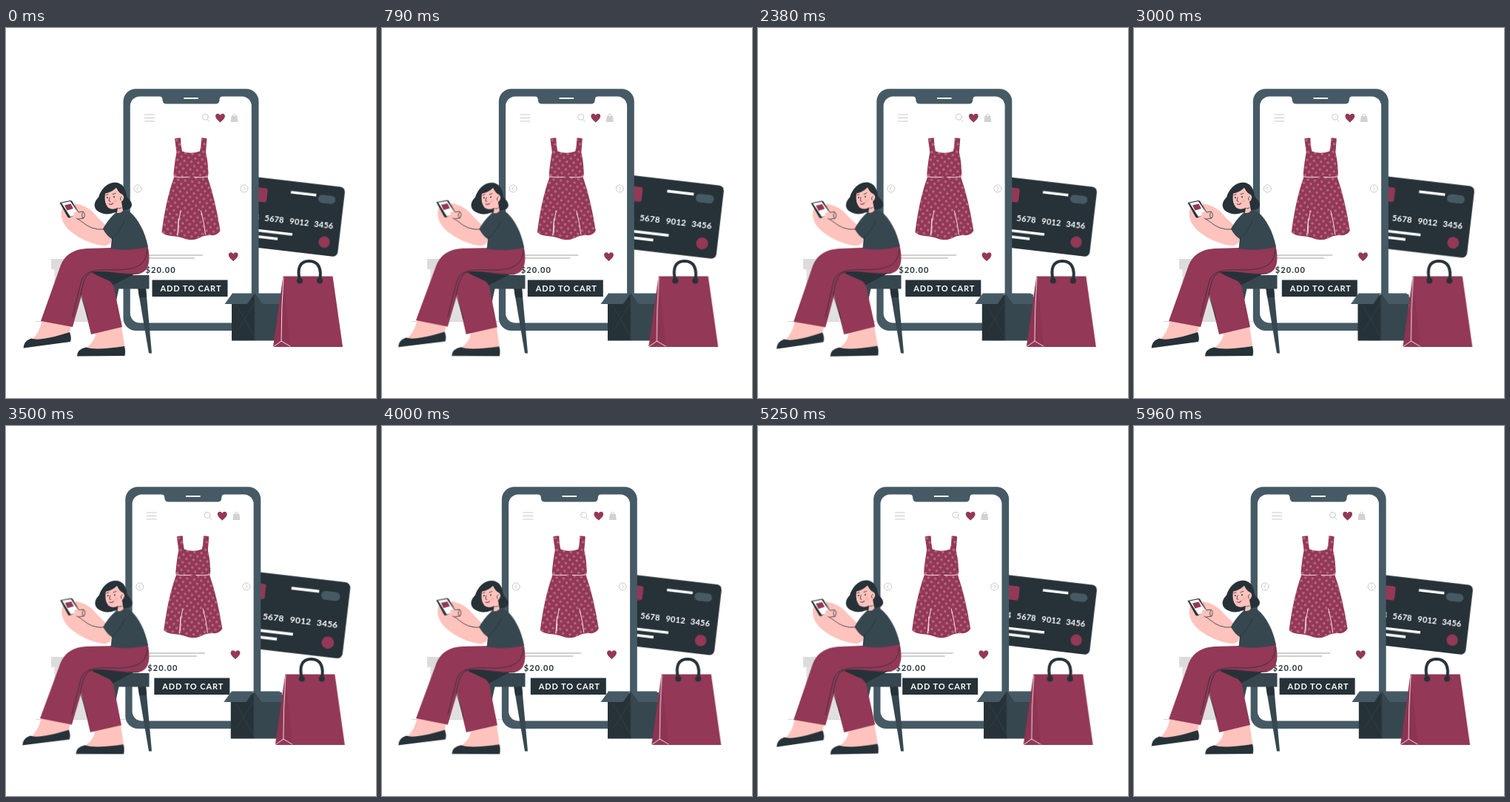
Animation, 500 px wide and 500 px high, one loop 6000 ms. Source, as an HTML page:

```html
<!DOCTYPE html>
<html lang="en">
<head>
<meta charset="utf-8">
<title>Mobile shopping</title>
<style>
  html, body { margin: 0; width: 100%; height: 100%; overflow: hidden; background: #fff; }
  svg { display: block; width: 100vw; height: 100vh; }
  text { font: 700 11px Lato, "Open Sans", sans-serif; }

  .pink { fill: #933856; }
  .dark { fill: #263238; }
  .slate { fill: #37474f; }
  .steel { fill: #455a64; }
  .skin { fill: #ffc3bd; }
  .white { fill: #fff; }
  .pale { fill: #dcdcdc; }
  .ink, .thin, .light { fill: none; stroke-linecap: round; stroke-linejoin: round; }
  .ink { stroke: #263238; stroke-width: .8; }
  .thin { stroke: #c9c9c9; stroke-width: 1; }
  .light { stroke: #f3dfe5; stroke-width: 1; }

  .sway { animation: sway 6s linear infinite; }
  .carton { animation: carton 6s linear infinite; }
  .card { transform-origin: 378px 252px; animation: pulse 6s linear infinite; }
  .person { transform-origin: 125px 305px; animation: rock 3s infinite; }

  @keyframes sway {
    0% { transform: translateX(0); }
    13.2% { transform: translateX(-.7px); }
    29.2% { transform: translateX(1.3px); }
    50% { transform: translateX(2.3px); }
    66.7% { transform: translateX(3.3px); }
    77.2% { transform: translateX(-3.6px); }
    99.3%, 100% { transform: translateX(-.9px); }
  }
  @keyframes carton {
    0%, 13.2% { transform: translateX(0); }
    29.2% { transform: translateX(-2px); }
    50% { transform: translateX(-2.6px); }
    66.7% { transform: translateX(0); }
    77.2% { transform: translateX(1px); }
    99.3%, 100% { transform: translateX(-1.2px); }
  }
  @keyframes pulse {
    0%, 5% { transform: scale(1); }
    10.5% { transform: scale(1.024); }
    13.2% { transform: scale(1.05); }
    20% { transform: scale(1.1); animation-timing-function: ease-in-out; }
    29.2% { transform: scale(1.038); }
    35%, 43% { transform: scale(1); }
    50% { transform: scale(1.025); }
    57.5% { transform: scale(1.1); }
    63.2% { transform: scale(1.05); }
    66.7% { transform: scale(1.012); }
    70%, 100% { transform: scale(1); }
  }
  @keyframes rock {
    0% { transform: rotate(0); animation-timing-function: ease-out; }
    25% { transform: rotate(.72deg); animation-timing-function: ease-in-out; }
    75% { transform: rotate(-.72deg); animation-timing-function: ease-in; }
    100% { transform: rotate(0); }
  }
</style>
</head>
<body>
<svg viewBox="0 0 500 500">
  <defs>
    <pattern id="dots" width="9.500" height="10.500" patternUnits="userSpaceOnUse" patternTransform="rotate(8)">
      <g fill="none" stroke="#d9a5b6" stroke-width=".7">
        <circle cx="2.500" cy="2.500" r="1.100"/>
        <circle cx="7.200" cy="7.700" r="1.100"/>
      </g>
    </pattern>
    <path id="heart" d="M0 6.200C-3 3.400-6.400.8-6.400-2.400C-6.400-6.400-1.400-6.900 0-3.400C1.400-6.900 6.400-6.400 6.400-2.400C6.400.8 3 3.400 0 6.200Z"/>
    <path id="dress" d="M228 149.500Q232 148 236 148.500Q236 158 238 166.500Q250 171 262 166.500Q264 158 264 148.500Q268 148 271.500 149.500L270 168Q273 180 273.500 197L272.500 202Q283 232 289.500 274Q285 281 277 280Q266 280 262 283.500Q250 289 238 283.500Q231 281 223 281Q214 280 210.500 276Q216 232 227 202L226.500 197Q228 180 230.500 168Z"/>
  </defs>

  <path d="M40 396.500H330" stroke="#cfcfcf" stroke-width=".8"/>
  <path class="pale" d="M61 312H125V326H61Z"/>
  <path d="M65.500 326H110V396H65.500Z" fill="#e0e0e0"/>

  <g class="card">
    <g transform="translate(378 252) rotate(6.7)">
      <rect class="dark" x="-85" y="-45.700" width="160.800" height="94.700" rx="6.500"/>
      <rect class="pink" x="-52" y="-32" width="24" height="19" rx="3"/>
      <rect class="white" x="3.500" y="-32.500" width="34.500" height="3.500"/>
      <rect class="steel" x="41" y="-32.300" width="23.500" height="11" rx="5.500"/>
      <g class="white" text-anchor="middle" letter-spacing=".2">
        <text x="-48" y="11.500">1234</text>
        <text x="-14.500" y="11.500">5678</text>
        <text x="19.500" y="11.500">9012</text>
        <text x="52.700" y="11.500">3456</text>
      </g>
      <rect class="white" x="-60" y="24" width="72" height="3.500"/>
      <rect class="white" x="-60" y="32.300" width="53" height="3.500"/>
      <circle class="pink" cx="56" cy="31" r="7.700"/>
    </g>
  </g>

  <g class="sway">
    <rect class="steel" x="158.500" y="82.300" width="183" height="326.700" rx="17"/>
    <rect class="white" x="167.800" y="92.500" width="164" height="306" rx="13"/>
    <path class="steel" d="M207 92H293Q288.500 92.500 288.500 97Q288.500 102.500 283 102.500H217Q211.500 102.500 211.500 97Q211.500 92.500 207 92Z"/>
    <path d="M241 95H259" stroke="#fff" stroke-width="2" stroke-linecap="round"/>

    <path class="thin" d="M187.500 117H200.500M187.500 121.500H200.500M187.500 126H200.500"/>
    <path class="thin" d="M272 123.500L275 126.500"/>
    <circle class="thin" cx="269.300" cy="120.300" r="3.900"/>
    <use href="#heart" class="pink" x="289.500" y="121.500"/>
    <path fill="#d2d2d2" d="M304.500 119H312.500L313.500 127H303.500Z"/>
    <path class="thin" d="M306.500 120V117.500Q308.500 115 310.500 117.500V120"/>

    <circle class="thin" cx="178" cy="217" r="5"/>
    <circle class="thin" cx="322" cy="217" r="5"/>
    <path class="thin" d="M179 214.500L176.500 217L179 219.500M321 214.500L323.500 217L321 219.500"/>

    <use href="#dress" class="pink"/>
    <use href="#dress" fill="url(#dots)"/>
    <path class="light" d="M227.500 201Q236 202.500 246 201.500M254 201.500Q264 202.500 272 201"/>
    <path class="light" d="M236 247Q232 264 231.500 280M233 258V277M263.500 247Q268 264 269.500 279"/>

    <path d="M180 307H266M180 311H255" stroke="#d0d0d0" stroke-width="1.800"/>
    <use href="#heart" class="pink" x="307.200" y="309"/>
    <text class="dark" x="188.500" y="330.500" letter-spacing="1.100">$20.00</text>
    <rect class="dark" x="197.500" y="340.500" width="102" height="22.500"/>
    <text class="white" x="208.500" y="356" letter-spacing=".9">ADD TO CART</text>
  </g>

  <g class="carton">
    <path class="dark" d="M305 361H336V422.500H305Z"/>
    <path class="slate" d="M335.500 360H374V422.500H335.500Z"/>
    <path class="steel" d="M306 358.500H336L326 373H295.500Z"/>
    <path class="steel" d="M336 358.500H371L382 373H346Z"/>
    <path class="ink" stroke-opacity=".55" d="M336 359L346 373M336 359V422"/>
    <path fill="none" stroke="#37474f" stroke-width=".6" d="M335 373L313 408M312 375L335 416"/>
  </g>

  <g class="sway">
    <path class="pink" d="M374.500 335.500H441.500L455 431H361Z"/>
    <path fill="#7f2c49" opacity=".35" d="M374.500 336L361 431L372 423L384 430Z"/>
    <path class="light" d="M375 337Q372 380 372 423M361.500 430.500L372 423L384 430"/>
    <path d="M397 341C393 325 397 315 409.500 315S427 325 424 341" fill="none" stroke="#263238" stroke-width="4"/>
    <circle class="dark" cx="397" cy="341.500" r="4"/>
    <circle class="dark" cx="424" cy="341.500" r="4"/>
  </g>

  <path class="slate" d="M145 350H153L147 378H142Z"/>
  <path class="slate" d="M178 351H189L197 439.500H193Z"/>
  <path class="dark" d="M178.500 351H189L190 364H180Z"/>
  <path class="slate" d="M140 334H193.500V352.500H140Z"/>
  <path class="dark" d="M108 328H182L165 337L144 348Z"/>

  <g class="person">
    <path class="skin" d="M49 394L88 402L86 411Q74 417 55 423L35 421Q45 413 49 394Z"/>
    <path class="dark" d="M23.500 432.500Q24 423 34 419.500Q45 424 86 411Q89 418 87 424Z"/>
    <path class="skin" d="M121 410L156 403L160.500 431Q140 438 107 433Q122 423 121 410Z"/>
    <path class="dark" d="M96 443.500Q96 434 108 431.500Q121 436 160 430Q162 436 160.500 443Z"/>

    <path class="pink" d="M191 293C195 308 196 329 180 332C164 335 140 328 121 329C109 332 107 347 103 358L90 404L47 396L73 323C79 307 90 299 110 298L143 297Z"/>
    <path class="pink" d="M103 346C104 333 108 328 114 330L140 342Q146 346 147 356L157 404L115 414L101 356Z"/>
    <path class="ink" d="M191 299C190 321 176 326 150 327C120 326 105 327 101 345L90 390"/>
    <path class="ink" d="M180 332C160 334 137 328 116 330C106 333 104 346 101 360L111 393"/>

    <path class="skin" d="M88 237C104 237 115 245 122 254L135 267L143 284C143 291 138 295 130 294C110 291 86 278 78 264C73 254 74 245 78 241Z"/>

    <path class="slate" d="M149 249C156 245 163 245 168 249C179 259 188 275 192 296C175 300 156 301 142 298L143 285Q136 281 131 271.500C136 262 143 254 149 249Z"/>
    <path class="ink" d="M160 261Q155 273 143 285M142 298L144 283"/>

    <path class="dark" d="M72.500 236L87 233Q89 233 90 235L97 250L86 256.500Q84 257 83 255Z"/>
    <path class="white" d="M75 236.500L87 234.200L98 251L87 255Z"/>
    <path class="pink" d="M79 239.500L87.500 237.500L91 244L82.500 246.500Z"/>
    <path class="skin" d="M91 250L98 247L106 250L104 258L94 256Z"/>
    <path class="ink" d="M93 240L98 249L104 248Q108 251 105 257L98 258M104 249Q101 253 104 257M95 257C102 260 107 267 116 270Q124 273 132 272"/>

    <g transform="translate(0 .8)">
      <path class="dark" d="M147 208C157 208 162 216 163 226C165 231 170 232 170 239C169 244 164 246 157 245C153 246 150 249 145 249C139 252 129 251 123 246C117 240 120 233 125 228C128 218 136 208 147 208Z"/>
      <path class="skin" d="M134 223Q143 221 149 215Q153 223 157 224Q161 227 158 232L156 234L158 246Q155 250 150 249L151 242Q144 246 138 242Q132 235 134 223Z"/>
      <path class="ink" d="M135 225L138 224M144 224L148 222.500M140 228L139 233L141 233.500M156 227Q153 229 155 232M160 236L158 242M156 242Q154 244 152 243"/>
      <circle class="dark" cx="136.800" cy="228.500" r="1"/>
      <circle class="dark" cx="146" cy="227.500" r="1"/>
      <path d="M139 236.500Q142 239 145 235.500" fill="none" stroke="#933856" stroke-width="1.100"/>
      <circle cx="148" cy="233" r="2.500" fill="#f9a9a4" opacity=".5"/>
    </g>
  </g>
</svg>
</body>
</html>
```
